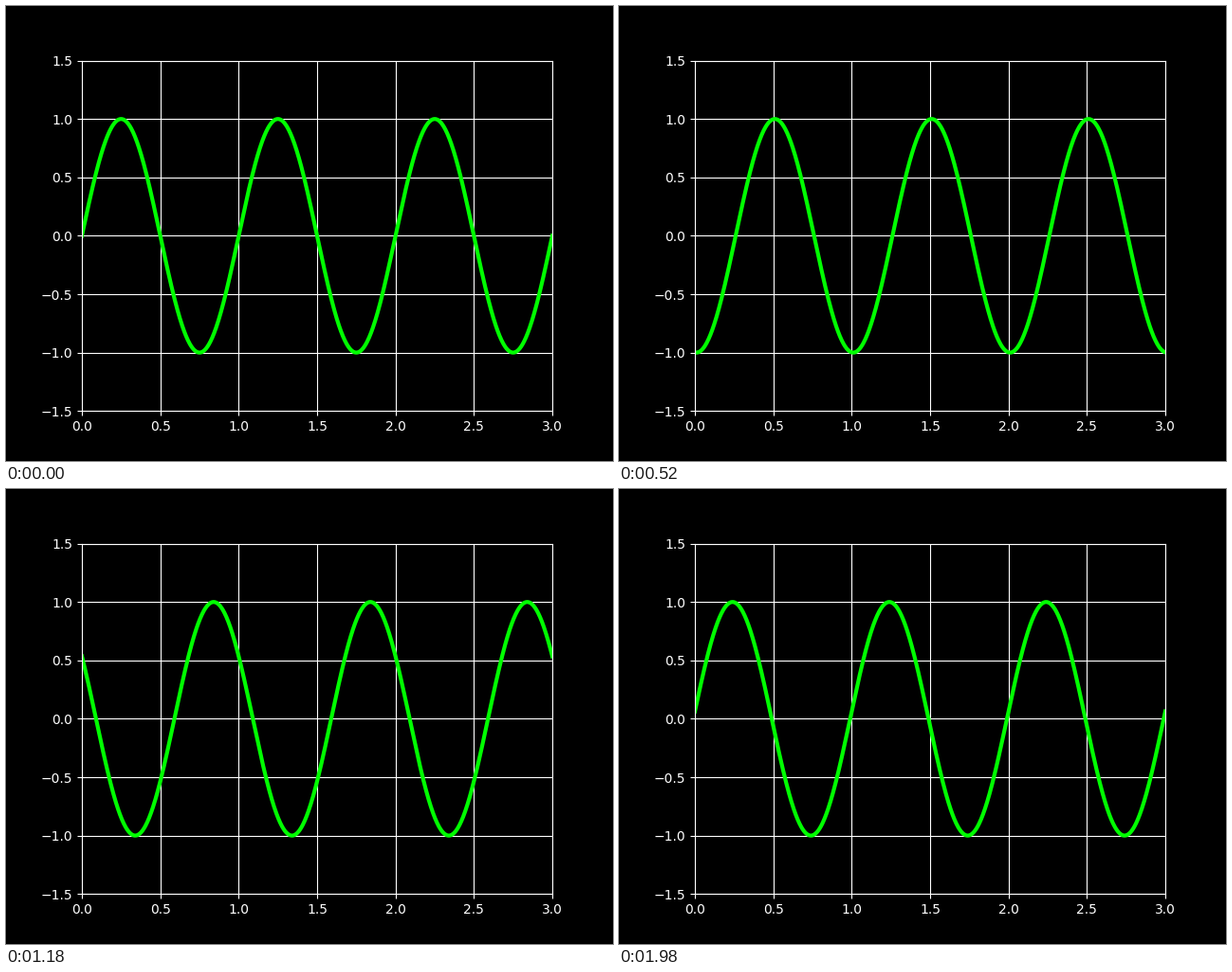
A matplotlib script for the animation above (2000 ms loop, 640 by 480 pixels).

```python
import numpy as np
import matplotlib.pyplot as plt
from matplotlib.animation import FuncAnimation

FRAMES = 100
INTERVAL = 20  # ms

plt.style.use("dark_background")
fig, ax = plt.subplots(figsize=(6.4, 4.8), dpi=100)
ax.set_xlim(0, 3)
ax.set_ylim(-1.5, 1.5)
ax.grid(True)

x = np.linspace(0, 3, 1000)
line, = ax.plot(x, np.sin(2 * np.pi * x), color="#00ff00", lw=3)


def update(i):
    # the wave travels right by one full period per loop
    line.set_ydata(np.sin(2 * np.pi * (x - i / FRAMES)))
    return line,


anim = FuncAnimation(fig, update, frames=FRAMES, interval=INTERVAL,
                     repeat=True, repeat_delay=0)
plt.show()
```
